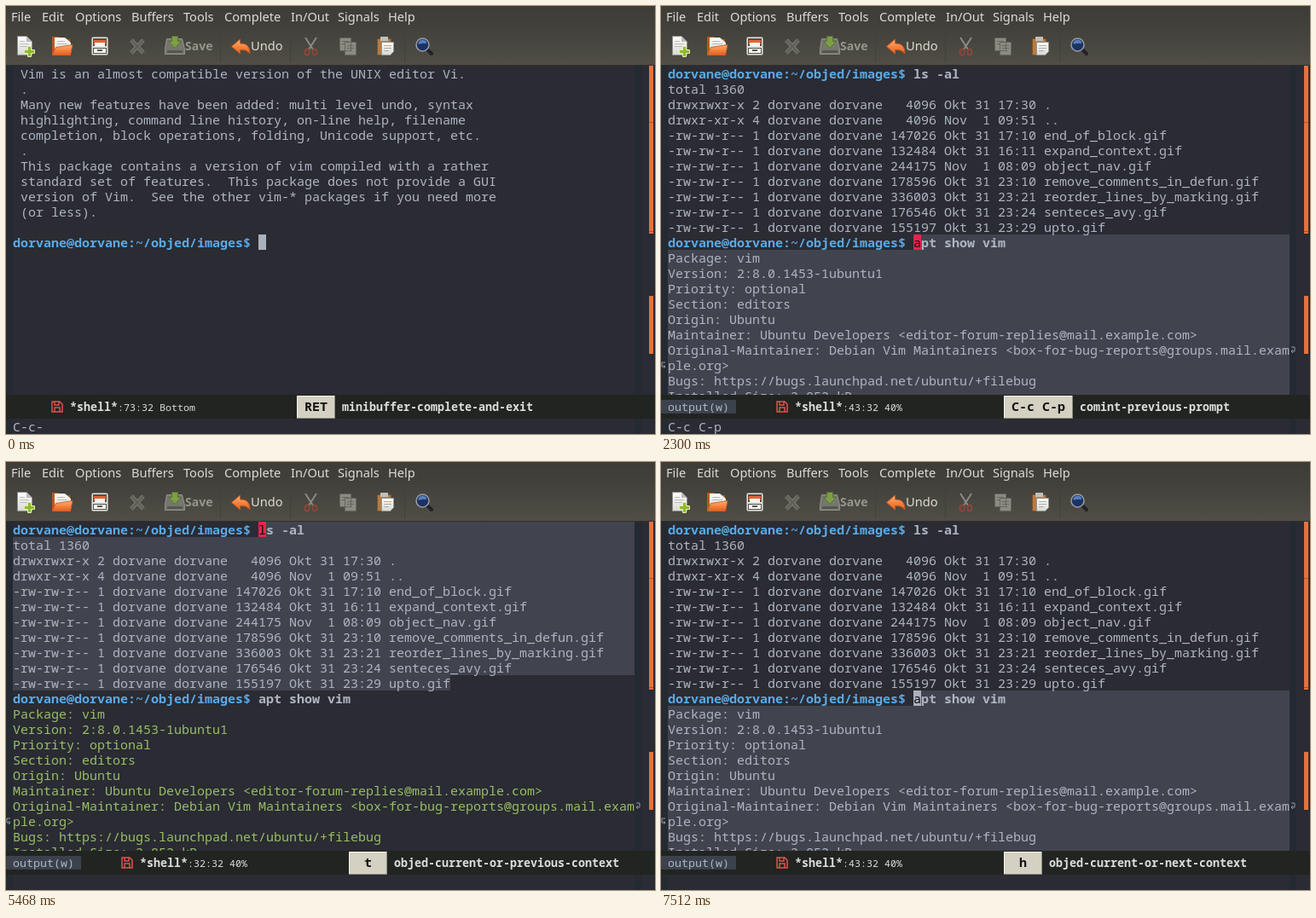
Write an HTML page that moves like this. It is 761 px wide and 502 px high and loops after 8000 ms.

```html
<!DOCTYPE html>
<html lang="en">
<head>
<meta charset="utf-8">
<title>Shell session</title>
<style>
html, body { margin: 0; width: 100%; height: 100%; overflow: hidden; background: #2a2b33; }
svg { display: block; width: 761px; height: 502px; }
text { white-space: pre; font: 15px "Noto Sans Mono", monospace; fill: #aeb5c1; }
.ui { font: 14.6px "Noto Sans", sans-serif; fill: #dfdbd2; }
.b { font-weight: 700; }
.prompt { font-weight: 700; fill: #5aaae6; }
.green { fill: #98be65; }
.mid { font-size: 13.333px; }
.small { font-size: 11.667px; }
.light { fill: #dcdedc; }
.dark { fill: #111; }
</style>
</head>
<body>
<svg viewBox="0 0 761 502">
  <defs>
    <linearGradient id="bar" x2="0" y2="1"><stop stop-color="#3d3c37"/><stop offset=".4" stop-color="#42413b"/><stop offset="1" stop-color="#504e46"/></linearGradient>
    <linearGradient id="orange" x2="0" y2="1"><stop stop-color="#ffb36b"/><stop offset="1" stop-color="#e95b1c"/></linearGradient>
    <linearGradient id="paper" x2="0" y2="1"><stop stop-color="#fff"/><stop offset="1" stop-color="#d8d8d4"/></linearGradient>
    <clipPath id="buffer"><path d="M0 70H761V456H0z"/></clipPath>
  </defs>
  <path fill="#2a2b33" d="M0 0H761V502H0z"/>
  <path fill="#242a31" d="M0 70H8V502H0zM737 70h8V502h-8z"/>
  <path fill="url(#bar)" d="M0 0H761V69H0z"/>
  <path fill="#302f2b" d="M0 69H761v1H0z"/>
  <path stroke="#414039" d="M251.500 31V66M333.500 31V66M467.500 31V66"/>
  <g id="menu"></g>

  <g id="tools">
    <path fill="url(#paper)" stroke="#8f8f89" d="M13.500 35.500H24L30.500 42V57.500H13.500z"/>
    <path fill="#bbb" d="M24 35.500V42H30.500zM16 41h6v1H16zM16 44h11v1H16zM16 47h9v1H16z"/>
    <path fill="#8ebb2c" stroke="#e5efb5" d="M25.500 47.500h4v4h4v4h-4v4h-4v-4h-4v-4h4z"/>

    <path fill="#bc571f" d="M54 36h8l2 3h11V57H54z"/>
    <path fill="url(#paper)" d="M57 37H69L76 43V54H57z"/>
    <path stroke="#b9b9b3" d="M60 41.500h9M60 44.500h12"/>
    <path fill="url(#orange)" stroke="#cf652a" d="M58.500 48.500L78 45.500L75.500 57.500H54.500z"/>

    <rect x="100.500" y="36.500" width="19" height="21" rx="2" fill="#e4e4df" stroke="#9b9b95"/>
    <path fill="#504e48" d="M102 38h16v9H102zM102 49h16v7H102z"/>
    <path fill="#e8632c" d="M103 40h14v5H103z"/>
    <path fill="#f5f5f0" d="M104 43h12v4H104zM103 50h14v5H103z"/>
    <path fill="#55534d" d="M107 51h6v2H107z"/>

    <path fill="none" stroke="#74736b" stroke-width="5" d="M147 40L161 55M161 40L147 55"/>
    <path fill="none" stroke="#5f5e57" stroke-width="2" d="M147 40L161 55M161 40L147 55"/>

    <path fill="#75776f" stroke="#92938a" d="M188.500 38.500H206.500L209.500 50.500V56.500H186.500V50.500z"/>
    <path fill="#55574f" d="M189 52h18v3H189z"/>
    <path fill="#7c9e45" stroke="#58702e" d="M194.500 35.500h7v6h4l-7.500 8-7.500-8h4z"/>
    <text class="ui b" x="210" y="52" style="font-size:14px;fill:#96958c">Save</text>

    <path fill="url(#orange)" stroke="#c9581e" d="M264.500 47.500L274.500 39V44Q286 43.500 286 55.500Q281 50.500 274.500 51.500V56z"/>
    <text class="ui" x="287" y="52">Undo</text>

    <path fill="none" stroke="#8b8a83" stroke-width="2" d="M351 37L360 51M364 37L355 51"/>
    <g fill="none" stroke="#8a463b" stroke-width="2"><ellipse cx="353" cy="54" rx="2.500" ry="3.500"/><ellipse cx="362" cy="54" rx="2.500" ry="3.500"/></g>

    <path fill="#8c8b83" stroke="#66655e" d="M391.500 37.500h13v15h-13zM397.500 42.500h13v15h-13z"/>
    <path stroke="#66655e" d="M394 41.500h8M394 44.500h3M400 46.500h8M400 49.500h8M400 52.500h6"/>

    <rect x="435.500" y="38.500" width="16" height="19" rx="1" fill="#b57b43" stroke="#82532a"/>
    <path fill="#bfc0ba" d="M439 36h9v5H439z"/>
    <path fill="url(#paper)" stroke="#96968f" d="M440.500 42.500h14v11l-4 4h-10z"/>
    <path stroke="#aaa" d="M443 46.500h9M443 49.500h9M443 52.500h6"/>

    <path stroke="#22232b" stroke-width="4" stroke-linecap="round" d="M494 51l5 5"/>
    <circle cx="488.500" cy="45.500" r="7.500" fill="#1d3263" stroke="#9a9da3" stroke-width="1.500"/>
    <path fill="#587fbd" d="M483.500 45a5 5 0 0 1 10-1q-5-1-10 1z"/>
  </g>

  <path fill="#e9703a" d="M754 70h5V267h-5zM754 340h5v68h-5z"/>
  <path fill="#b4522b" d="M754 136h5v1h-5zM754 264h5v1h-5z"/>
  <g id="screen" clip-path="url(#buffer)"></g>
  <path fill="#212421" d="M0 456H761V484H0z"/>
  <g id="status"></g>
</svg>
<script>
const $ = id => document.getElementById(id);
const LEFT = 8, CHAR = 9, ROW = 18, TOP = 70, RIGHT = 737, INPUT_X = 296;
const USER = "dorvane";
const PROMPT = `${USER}@${USER}:~/objed/images$`;

const description = ` Vim is an almost compatible version of the UNIX editor Vi.
 .
 Many new features have been added: multi level undo, syntax
 highlighting, command line history, on-line help, filename
 completion, block operations, folding, Unicode support, etc.
 .
 This package contains a version of vim compiled with a rather
 standard set of features.  This package does not provide a GUI
 version of Vim.  See the other vim-* packages if you need more
 (or less).`.split("\n");

const file = (mode, links, size, date, name) =>
  `${mode} ${links} ${USER} ${USER} ${size.padStart(6)} ${date} ${name}`;
const listing = ["total 1360",
  file("drwxrwxr-x", 2, "4096", "Okt 31 17:30", "."),
  file("drwxr-xr-x", 4, "4096", "Nov  1 09:51", ".."),
  ...[["147026", "Okt 31 17:10", "end_of_block"],
    ["132484", "Okt 31 16:11", "expand_context"],
    ["244175", "Nov  1 08:09", "object_nav"],
    ["178596", "Okt 31 23:10", "remove_comments_in_defun"],
    ["336003", "Okt 31 23:21", "reorder_lines_by_marking"],
    ["176546", "Okt 31 23:24", "senteces_avy"],
    ["155197", "Okt 31 23:29", "upto"]
  ].map(([size, date, name]) => file("-rw-rw-r--", 1, size, date, name + ".gif"))];

const details = `Package: vim
Version: 2:8.0.1453-1ubuntu1
Priority: optional
Section: editors
Origin: Ubuntu
Maintainer: Ubuntu Developers <editor-forum-replies@mail.example.com>
Original-Maintainer: Debian Vim Maintainers <box-for-bug-reports@groups.mail.exam
ple.org>
Bugs: https://bugs.launchpad.net/ubuntu/+filebug
Installed-Size: 2,852 kB`.split("\n");

const escape = s => s.replace(/&/g, "&amp;").replace(/</g, "&lt;").replace(/>/g, "&gt;");
const text = (x, y, s, cls = "") => `<text x="${x}" y="${y}" class="${cls}">${escape(s)}</text>`;
const rect = (x, y, w, h, fill) => `<rect x="${x}" y="${y}" width="${w}" height="${h}" fill="${fill}"/>`;
const rowTop = row => TOP + row * ROW;
const line = (row, s, cls, x = LEFT) => text(x, rowTop(row) + 15, s, cls);
const lines = (row, list, cls) => list.map((s, i) => line(row + i, s, cls)).join("");
const mark = (row, from, to, count = 1) => rect(from, rowTop(row), to - from, count * ROW, "#41444f");
const cursor = (row, fill) => rect(INPUT_X, rowTop(row), CHAR, ROW, fill);
const command = (row, s) => line(row, PROMPT, "prompt") + line(row, s, "b", INPUT_X);

const wrapArrow = (x, y, flip) =>
  `<path transform="translate(${x} ${y}) scale(${flip} 1)" fill="none" stroke="#9299a4" d="M-2-3H2V2H-2M0 0L-2 2L0 4"/>`;

function session(row, color, selection, detailClass) {
  const first = row ? "a" : "l";
  return selection + command(0, "ls -al") + lines(1, listing) +
    command(11, "apt show vim") + lines(12, details, detailClass) +
    cursor(row, color) + line(row, first, "dark", INPUT_X) +
    wrapArrow(741, 403, 1) + wrapArrow(3, 421, -1);
}

// A raised button: light top and left edges, dark bottom and right edges.
const button = (x, y, w, h) => rect(x, y, w, h, "#8f8c82") +
  rect(x, y, w - 1, h - 1, "#f6f4ea") + rect(x + 1, y + 1, w - 2, h - 2, "#d4d0c2");

function status({ x, place, keyX, keyWidth, key, action, echo = "", object }) {
  const keyTextX = keyX + (keyWidth - key.length * CHAR) / 2;
  return (object ? rect(0, 462, 88, 16, "#3b424c") + text(8, 475, object, "mid") : "") +
    `<g transform="translate(${x - 22} 463)" fill="none" stroke="#e0534c" stroke-width="1.500">
      <path d="M1 1H10L13 4V13H1zM4 1V5H9V1M4 13V8H10V13"/></g>` +
    text(x, 475, "*shell*", "mid b light") + text(x + 56, 475, place, "small light") +
    button(keyX, 457, keyWidth, 27) + text(keyTextX, 475, key, "b dark") +
    text(keyX + keyWidth + 8, 475, action, "mid b light") + text(LEFT, 499, echo);
}

const selectDetails = mark(11, INPUT_X, RIGHT) + mark(12, LEFT, RIGHT, 10);
const selectListing = mark(0, INPUT_X, RIGHT) + mark(1, LEFT, RIGHT, 9) + mark(10, LEFT, 521);
const objectStatus = { x: 157, keyX: 402, keyWidth: 45, object: "output(w)" };

const steps = [
  { start: 0,
    screen: lines(0, description) + command(11, "") + cursor(11, "#aab1bd"),
    status: status({ x: 75, place: ":73:32 Bottom", keyX: 341, keyWidth: 45, key: "RET",
      action: "minibuffer-complete-and-exit", echo: "C-c-" }) },
  { start: 500,
    screen: session(11, "#e8234f", selectDetails),
    status: status({ ...objectStatus, place: ":43:32 40%", keyWidth: 81, key: "C-c C-p",
      action: "comint-previous-prompt", echo: "C-c C-p" }) },
  { start: 3500,
    screen: session(0, "#e8234f", selectListing, "green"),
    status: status({ ...objectStatus, place: ":32:32 40%", key: "t",
      action: "objed-current-or-previous-context" }) },
  { start: 6780,
    screen: session(11, "#aab1bd", selectDetails),
    status: status({ ...objectStatus, place: ":43:32 40%", key: "h",
      action: "objed-current-or-next-context" }) }
];

const menu = { File: 6, Edit: 42, Options: 81, Buffers: 147, Tools: 208,
  Complete: 256, "In/Out": 334, Signals: 389, Help: 448 };
$("menu").innerHTML = Object.entries(menu).map(([name, x]) => text(x, 18, name, "ui")).join("");

let shown;
function draw(now) {
  const time = now % 8000;
  const step = steps.findLast(s => s.start <= time);
  if (step !== shown) {
    $("screen").innerHTML = step.screen;
    $("status").innerHTML = step.status;
    shown = step;
  }
  requestAnimationFrame(draw);
}
draw(performance.now());
</script>
</body>
</html>
```
